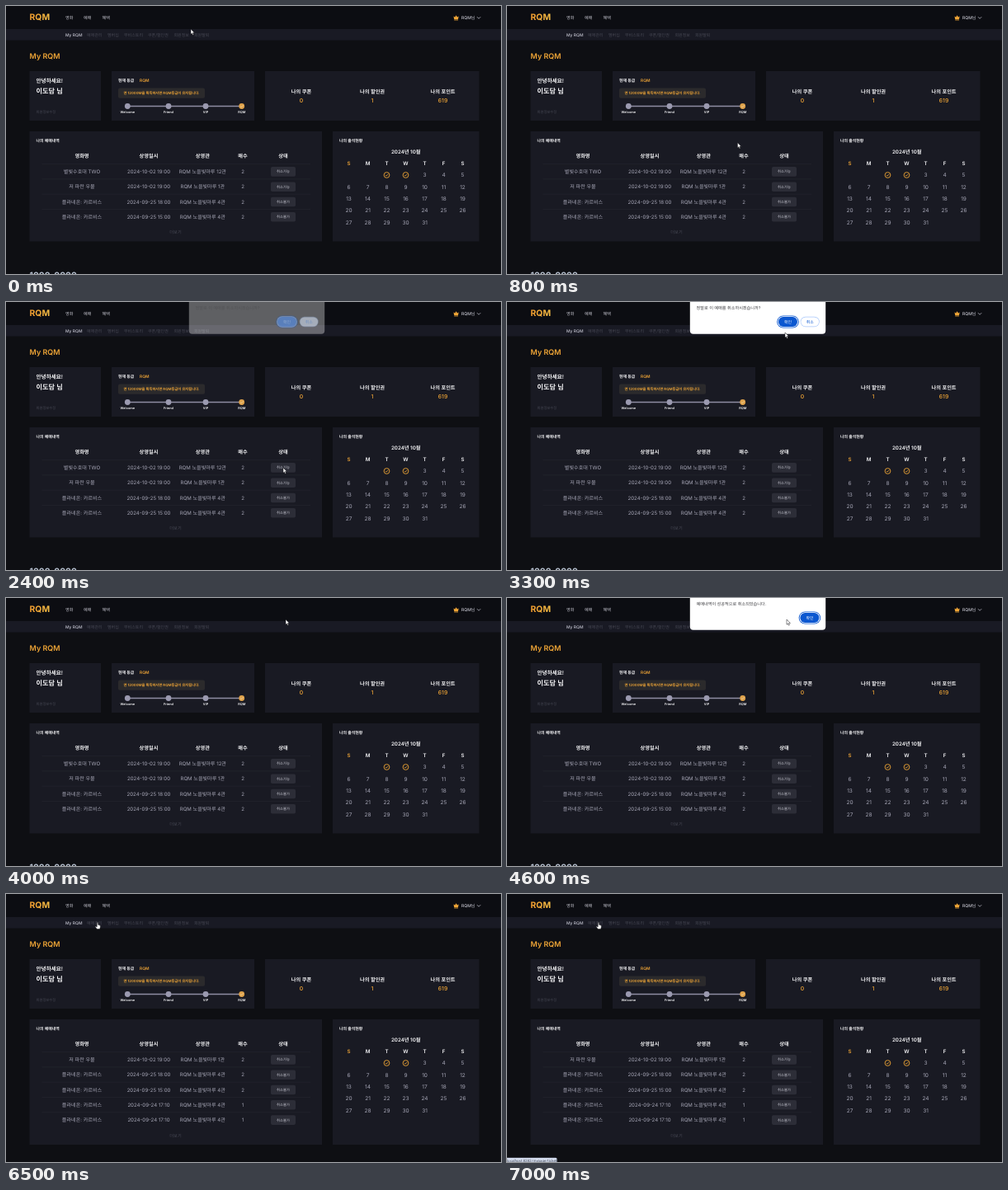
These frames come from a looping animation (600 px wide and 325 px high, 8 s). An HTML page with a canvas:

```html
<!DOCTYPE html>
<html lang="ko">
<head>
<meta charset="utf-8">
<title>My RQM</title>
<style>
html, body { margin: 0; width: 100%; height: 100%; overflow: hidden; background: #0e0f13; }
canvas { display: block; width: 600px; height: 325px; }
</style>
</head>
<body>
<canvas id="stage"></canvas>
<script>
const LOOP = 8000;
const BRAND = 'RQM';
const ORANGE = '#efa536', WHITE = '#f4f4f6', SOFT = '#a6a6b6', DIM = '#474854';
const CARD = '#191a23', BLUE = '#0b57d0';
const FAMILY = 'Inter, "Noto Sans CJK KR", "Noto Sans CJK", sans-serif';

const canvas = document.getElementById('stage');
const ctx = canvas.getContext('2d');
const ratio = window.devicePixelRatio || 1;
canvas.width = 600 * ratio;
canvas.height = 325 * ratio;
ctx.textRendering = 'geometricPrecision';

// y is the middle of the capitals
function text(str, x, y, size, color, weight = 400, align = 'left') {
  ctx.font = `${weight} ${size}px ${FAMILY}`;
  ctx.textAlign = align;
  ctx.fillStyle = color;
  ctx.fillText(str, x, y + size * 0.36);
}

const centered = (str, x, y, size, color, weight) => text(str, x, y, size, color, weight, 'center');

function box(x, y, w, h, color, radius = 0) {
  ctx.beginPath();
  ctx.roundRect(x, y, w, h, radius);
  ctx.fillStyle = color;
  ctx.fill();
}

function dot(x, y, r, color) {
  ctx.beginPath();
  ctx.arc(x, y, r, 0, Math.PI * 2);
  ctx.fillStyle = color;
  ctx.fill();
}

function line(points, color, width) {
  ctx.beginPath();
  points.forEach(([x, y]) => ctx.lineTo(x, y));
  ctx.strokeStyle = color;
  ctx.lineWidth = width;
  ctx.stroke();
}

function polygon(points, fill, stroke, width) {
  ctx.beginPath();
  points.forEach(([x, y]) => ctx.lineTo(x, y));
  ctx.closePath();
  ctx.fillStyle = fill;
  ctx.fill();
  if (!stroke) return;
  ctx.strokeStyle = stroke;
  ctx.lineWidth = width;
  ctx.stroke();
}

const check = (x, y, color) =>
  line([[x - 1.6, y], [x - 0.4, y + 1.2], [x + 1.8, y - 1.2]], color, 0.8);

function drawHeader() {
  box(0, 0, 600, 28, '#0c0d12');
  box(0, 28, 600, 13.5, '#191a24');
  const gold = ctx.createLinearGradient(28, 0, 53, 0);
  gold.addColorStop(0, '#f09a2c');
  gold.addColorStop(1, '#f4bd45');
  text(BRAND, 28.5, 13.5, 10.4, gold, 700);
  [['영화', 72], ['예매', 94], ['혜택', 116.5]].forEach(([s, x]) => text(s, x, 14, 5.1, '#c8c8d2', 500));

  polygon([[542.5, 12.4], [544.2, 13.6], [545.6, 11.2], [547, 13.6], [548.7, 12.4], [548, 16], [543.2, 16]], ORANGE);
  box(543.2, 16.5, 4.8, 0.9, ORANGE);
  text(BRAND + '님', 552, 14, 5.1, '#c8c8d2', 500);
  line([[571, 13.2], [573.1, 15.3], [575.2, 13.2]], '#b8b8c4', 0.8);

  text('My ' + BRAND, 72, 35.5, 5, '#c6c6d2', 500);
  [['예매관리', 98], ['멤버십', 123], ['무비스토리', 143], ['쿠폰/할인권', 172], ['회원정보', 203.5], ['회원탈퇴', 228]]
    .forEach(([s, x]) => text(s, x, 35.5, 5, DIM));
}

function drawProfile() {
  text('My ' + BRAND, 28.5, 60.3, 9, ORANGE, 600);

  box(28.5, 79, 86.5, 60, CARD);
  text('안녕하세요!', 36.5, 91, 6.6, WHITE, 600);
  text('이도담 님', 36.5, 103, 8.2, WHITE, 600);
  text('회원정보수정', 36.5, 128.3, 4.3, DIM);

  box(128, 79, 173, 60, CARD);
  text('현재 등급', 136, 90, 4.9, WHITE, 600);
  text(BRAND, 162, 90, 4.9, ORANGE, 600);
  box(136, 99.5, 105, 12.2, '#2b2a2c', 2);
  centered(`연 12000M을 획득하시면 ${BRAND}등급이 유지됩니다.`, 188.5, 105.6, 4.3, ORANGE, 600);
  line([[147, 121.5], [286, 121.5]], '#8e8da2', 1.3);
  [['Welcome', 147.3], ['Friend', 197], ['VIP', 242], [BRAND, 285.7]].forEach(([s, x], i) => {
    dot(x, 121.5, 3.4, i < 3 ? '#9b9ab0' : '#dfa24a');
    if (i === 3) check(x, 121.5, '#f3d9a8');
    centered(s, x, 128.6, 3.9, WHITE, 600);
  });

  box(314, 79, 259.5, 60, CARD);
  [['나의 쿠폰', '0', 358], ['나의 할인권', '1', 444], ['나의 포인트', '619', 529.5]].forEach(([s, n, x]) => {
    centered(s, x, 103.7, 6.2, WHITE, 600);
    centered(n, x, 114.6, 6.8, ORANGE, 500);
  });
}

const HALL = BRAND + ' 노을빛마루 ';
const PLANET = '플라네온: 카르비스';
const BOOKINGS = [
  ['별빛수호대 TWO', '2024-10-02 19:00', '12관', 2, true],
  ['저 파란 우물', '2024-10-02 19:00', '1관', 2, true],
  [PLANET, '2024-09-25 18:00', '4관', 2, false],
  [PLANET, '2024-09-25 15:00', '4관', 2, false],
  [PLANET, '2024-09-24 17:10', '4관', 1, false],
  [PLANET, '2024-09-24 17:10', '4관', 1, false]
];
const COLUMNS = [92, 173, 238.3, 287, 336];

function drawBookings(cancelled, height) {
  const rows = cancelled ? BOOKINGS.slice(1) : BOOKINGS.slice(0, 4);
  box(28.5, 152, 354.5, height, CARD);
  text('나의 예매내역', 36.5, 163.2, 4.9, WHITE, 600);
  ['영화명', '상영일시', '상영관', '매수', '상태'].forEach((s, i) => centered(s, COLUMNS[i], 182, 6.2, WHITE, 600));
  rows.forEach(([title, date, hall, count, open], i) => {
    const y = 200.9 + i * 18.3;
    line([[43.5, y - 9.3], [369, y - 9.3]], '#26272f', 0.6);
    [title, date, HALL + hall, count].forEach((s, c) => centered(s, COLUMNS[c], y, 6.1, SOFT, 400));
    box(321, y - 5.8, 30, 11.6, '#2c2d37', 1.8);
    centered(open ? '취소가능' : '취소불가', 336, y, 4.3, '#c6c6d0');
  });
  centered('더보기', 205.5, 152 + height - 11.2, 5.2, DIM);
}

function drawCalendar(height) {
  const column = i => 415.5 + i * 23;
  box(396, 152, 177.5, height, CARD);
  text('나의 출석현황', 404, 163.2, 4.9, WHITE, 600);
  centered('2024년 10월', 484.7, 176.6, 6.2, WHITE, 600);
  [...'SMTWTFS'].forEach((s, i) => centered(s, column(i), 191, 6.2, i ? WHITE : ORANGE, 600));
  for (let day = 1; day <= 31; day++) {
    const x = column((day + 1) % 7), y = 205 + Math.floor((day + 1) / 7) * 14.3;
    if (day > 2) {
      centered(day, x, y, 6.5, SOFT);
      continue;
    }
    ctx.beginPath();
    ctx.arc(x, y, 3.4, 0, Math.PI * 2);
    ctx.strokeStyle = ORANGE;
    ctx.lineWidth = 0.9;
    ctx.stroke();
    check(x, y, ORANGE);
  }
}

function pill(label, x, primary, hover) {
  if (primary) {
    box(x - 1.8, 16.4, 26.6, 15.2, BLUE, 7.6);
    box(x - 0.9, 17.3, 24.8, 13.4, '#fff', 6.7);
    box(x, 18.1, 23, 11.8, hover ? '#2b6bd2' : BLUE, 5.9);
  } else {
    box(x, 17.8, 23, 12.4, '#a8c7fa', 6.2);
    box(x + 0.6, 18.4, 21.8, 11.2, '#fff', 5.6);
  }
  centered(label, x + 11.5, 24, 4.9, primary ? '#fff' : BLUE, 500);
}

function drawDialog(message, confirm, hover, alpha) {
  ctx.save();
  ctx.globalAlpha = alpha;
  box(221.8, -6, 164.4, 44.8, '#fff', 4);
  text(message, 229.5, 7.6, 5.15, '#3a3a3e');
  if (confirm) {
    pill('확인', 329, true, hover);
    pill('취소', 355.7, false);
  } else {
    pill('확인', 355.4, true, hover);
  }
  ctx.restore();
}

function drawStatus(alpha) {
  ctx.save();
  ctx.globalAlpha = alpha;
  box(-2, 319.8, 62.6, 8, '#8f98ad', 1.5);
  box(-2, 320.3, 62.1, 8, '#dde5f6', 1.2);
  ctx.font = '4.5px Roboto, sans-serif';
  ctx.textAlign = 'left';
  ctx.fillStyle = '#3c4250';
  ctx.fillText('localhost:8282/mypage/ticket', 0, 325);
  ctx.restore();
}

// time, x, y of the pointer tip
const PATH = [
  [0, 224, 28], [300, 228, 42], [1000, 292, 196], [1500, 308, 210], [1800, 308, 210],
  [2100, 336, 201], [3000, 336, 201], [3300, 337, 37], [3550, 339, 26], [4800, 339, 26],
  [5300, 374, 25], [6000, 374, 25], [6450, 111, 34.5], [LOOP, 111, 34.5]
];

function pointerAt(t) {
  const next = Math.max(1, PATH.findIndex(p => p[0] > t));
  const [t0, x0, y0] = PATH[next - 1], [t1, x1, y1] = PATH[next];
  const k = (t - t0) / (t1 - t0), ease = k * k * (3 - 2 * k);
  return [x0 + (x1 - x0) * ease, y0 + (y1 - y0) * ease];
}

function drawPointer(t) {
  const [x, y] = pointerAt(t);
  const hand = (t >= 2000 && t < 2400) || t >= 6400;
  ctx.save();
  ctx.translate(x, y);
  ctx.lineJoin = 'round';
  if (hand) {
    polygon([[-0.7, 0], [0.5, 0], [0.7, 2.8], [3.2, 3.6], [3.4, 5.6], [2.6, 8], [-0.8, 8], [-2.8, 5.2], [-2.2, 4.4], [-0.8, 5.4]],
      '#fff', '#16161a', 0.5);
  } else {
    polygon([[0, 0], [0, 6.2], [1.4, 5], [2.4, 7.2], [3.4, 6.7], [2.5, 4.6], [4.4, 4.5]], '#fff', '#16161a', 0.5);
  }
  ctx.restore();
}

const ramp = (t, start, length) => Math.min(1, Math.max(0, (t - start) / length));

function draw(t) {
  ctx.setTransform(ratio, 0, 0, ratio, 0, 0);
  box(0, 0, 600, 325, '#0e0f13');
  const cancelled = t >= 5500;
  const height = cancelled ? 152 : 133.5;
  drawHeader();
  drawProfile();
  drawBookings(cancelled, height);
  drawCalendar(height);
  if (!cancelled) text('1000-0000', 28.5, 326.6, 10.2, '#b9c3d2', 700);

  if (t >= 2400 && t < 3700) {
    drawDialog('정말로 이 예매를 취소하시겠습니까?', true, t >= 3400, ramp(t, 2350, 150));
  } else if (t >= 4400 && t < 5500) {
    drawDialog('예매내역이 성공적으로 취소되었습니다.', false, t >= 5100, ramp(t, 4350, 150));
  }
  if (t >= 6700) drawStatus(ramp(t, 6650, 250));
  drawPointer(t);
}

const start = performance.now();
function tick() {
  draw((performance.now() - start) % LOOP);
  requestAnimationFrame(tick);
}
tick();
</script>
</body>
</html>
```
